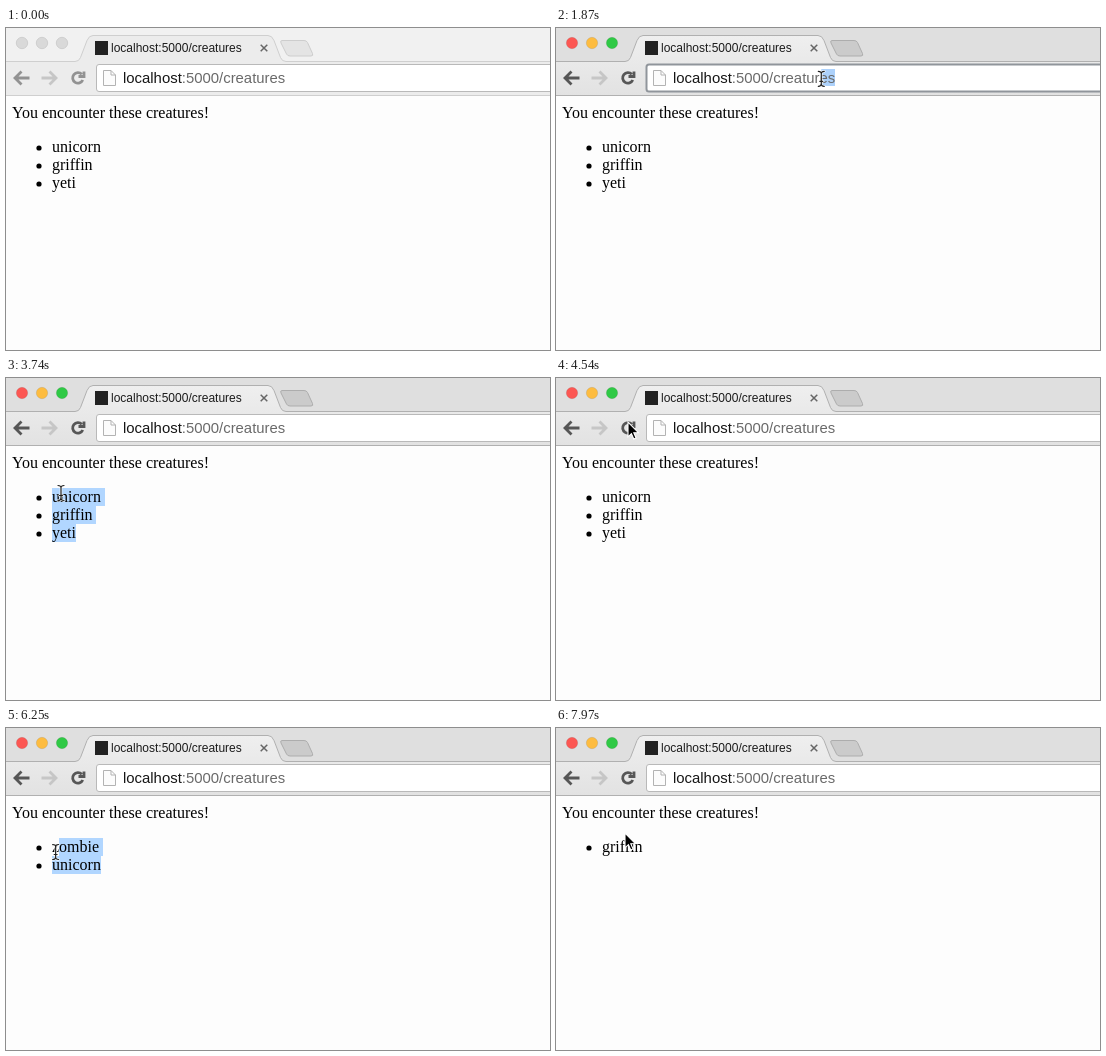
An HTML page for the animation above (8000 ms loop, 544 by 322 pixels).

```html
<!DOCTYPE html>
<html lang="en">
<head>
<meta charset="utf-8">
<title>Creatures</title>
<style>
  html, body { margin: 0; width: 100%; height: 100%; overflow: hidden; background: #fdfdfd; }
  svg { display: block; width: 544px; height: 322px; }
  text { white-space: pre; }
  .ui { font-family: "Liberation Sans", Arial, sans-serif; }
  .page { font: 16px "Liberation Serif", "Times New Roman", serif; }
  .icon { fill: none; stroke: #565656; stroke-width: 2.8; }
  .strip { fill: #dfdfdf; }
  .bar { fill: url(#barFill); stroke: #b0b0b0; }
  .plus { fill: #cbcbcb; stroke: #adadad; }
  .off .icon { stroke: #929292; }
  .icon.dim, .off .icon.dim { stroke: #c6c6c6; }
  .off .strip { fill: #f1f1f1; }
  .off .bar { fill: #ececec; stroke: #cfcfcf; }
  .off .plus { fill: #e4e4e4; stroke: #cdcdcd; }
  .off .light { fill: #d9d9d9; stroke: #c6c6c6; }
</style>
</head>
<body>
<svg id="stage" viewBox="0 0 544 322" class="off">
  <defs>
    <linearGradient id="barFill" x2="0" y2="1">
      <stop stop-color="#efefef"/><stop offset="1" stop-color="#e2e2e2"/>
    </linearGradient>
    <path id="beamShape" d="M-3 -7.5Q0 -7.5 0 -5V5Q0 7.5 -3 7.5M3 -7.5Q0 -7.5 0 -5M3 7.5Q0 7.5 0 5M-1.5 2.5h3"/>
  </defs>
  <rect width="544" height="322" fill="#fdfdfd"/>

  <rect class="strip" width="544" height="34"/>
  <g id="lights"></g>
  <path class="plus" d="M276 12.5h22q2.500 0 3.500 2l5 11q1 2.500 -1.500 2.500h-21q-2.500 0 -3.500 -2l-5.500 -11q-1 -2.500 1 -2.500z"/>
  <path class="bar" d="M-2 33.5H69q4 0 5.500 -4L81 12.500q2 -5 6 -5H262q4 0 6 5L274.500 29.500q1.500 4 5.500 4H546v34H-2z"/>

  <rect id="favicon" x="89" y="13" width="13" height="14" fill="#222"/>
  <circle id="spinner" cx="95.500" cy="20" r="5.500" fill="none" stroke="#8a8a8a" stroke-width="2" stroke-dasharray="26 9"/>
  <text class="ui" x="105" y="24" font-size="12" fill="#1c1c1c">localhost:5000/creatures</text>
  <path d="M254.700 16.700l6.600 6.600m0-6.600l-6.600 6.600" stroke="#666" stroke-width="1.500"/>

  <path class="icon" d="M23.500 50H10m5.500-6.500L9 50l6.500 6.500"/>
  <path class="icon dim" d="M35.500 50H49m-5.500-6.500L50 50l-6.500 6.500"/>
  <path class="icon" d="M75.800 46.200A5.300 5.300 0 1 0 76.800 52M78 43.500v5h-5.500"/>

  <rect id="box" x="90.500" y="36.500" width="460" height="27" rx="2.500" fill="#fff"/>
  <path d="M97.500 42.500h7.500l4.500 4.500v10.500h-12zm7.500 0v4.500h4.500" fill="#fcfcfc" stroke="#b3b3b3"/>
  <rect id="urlMark" y="41" height="17" fill="#acd1fb"/>
  <text class="ui" x="117" y="55" font-size="14.900" fill="#161616">localhost<tspan fill="#6a6a6a">:5000/creatures</tspan></text>

  <g id="marks" fill="#b1d6ff"></g>
  <g class="page">
    <text x="6" y="90">You encounter these creatures!</text>
    <g id="list"></g>
  </g>

  <path id="arrow" d="M0 0v14.800l3.400-3.200l2.400 5.400l2.300-1l-2.300-5.300h4.600z" stroke="#fff" stroke-width="1.100"/>
  <g id="beam" fill="none" stroke-linecap="round">
    <use href="#beamShape" stroke="#fff" stroke-opacity=".8" stroke-width="2.600"/>
    <use href="#beamShape" stroke="#222" stroke-width="1.200"/>
  </g>
</svg>
<script>
const LOOP = 8000, LEFT = 46, TOP = 110, ROW = 18;
const $ = id => document.getElementById(id);
const clamp = (v, lo, hi) => Math.max(lo, Math.min(hi, v));
const show = (el, on) => el.setAttribute("visibility", on ? "visible" : "hidden");
const within = (t, spans) => spans.some(([a, b]) => t >= a && t < b);

// Each move: start, end, then evenly timed stops. It sets out from the last stop.
const ORIGIN = [410, 315];
const moves = [
  [360, 540, [187, 173]],
  [920, 1650, [229, 39], [280, 14], [292, 42], [291, 51]],
  [1730, 2330, [107, 50]],
  [2480, 2530, [101, 116]],
  [2530, 2840, [88, 177], [73, 157]],
  [2840, 3350, [47, 116]],
  [3715, 3740, [55, 115]],
  [3740, 3990, [88, 98]],
  [4360, 4540, [72, 44]],
  [5530, 5680, [88, 99]],
  [5680, 5950, [100, 140], [97, 137]],
  [5950, 6390, [35, 120]],
  [6670, 6980, [88, 63]],
  [6980, 7100, [72, 44]],
  [7820, 7970, [69, 105]]
];
const beams = [[1070, 1120], [1430, 2500], [2840, 3850], [5950, 6750]];
const reloads = [[4960, 5160], [7230, 7420]];
const drags = [
  { from: 2840, to: 3350, clear: 4140, ends: [99, 90, 70] },
  { from: 5950, to: 6390, clear: 7330, ends: [97, 95] }
];
const lists = [
  [0, ["unicorn", "griffin", "yeti"]],
  [5060, ["zombie", "unicorn"]],
  [7330, ["griffin"]]
];

// Smooth curve through the stops, at rest at both ends.
function along(stops, u) {
  const n = stops.length - 1, i = Math.min(Math.floor(u * n), n - 1);
  const f = u * n - i, g = 1 - f;
  const slope = (j, k) => j > 0 && j < n ? (stops[j + 1][k] - stops[j - 1][k]) / 2 : 0;
  return [0, 1].map(k =>
    g * g * (1 + 2 * f) * stops[i][k] + f * f * (3 - 2 * f) * stops[i + 1][k]
    + f * g * (g * slope(i, k) - f * slope(i + 1, k)));
}

function pointer(t) {
  let pos = ORIGIN;
  for (const [from, to, ...stops] of moves) {
    if (t < from) break;
    pos = along([pos, ...stops], clamp((t - from) / (to - from), 0, 1));
  }
  return pos;
}

function markup(names) {
  return names.map((name, i) => {
    const y = TOP + ROW * i;
    return `<circle cx="33" cy="${y + 10}" r="2.6"/><text x="${LEFT}" y="${y + 14}">${name}</text>`;
  }).join("");
}

function selection(t) {
  const drag = drags.find(d => t >= d.from && t < d.clear);
  if (!drag) return "";
  const [px, py] = pointer(Math.min(t, drag.to));
  const row = clamp(Math.floor((py - TOP) / ROW), 0, drag.ends.length - 1);
  return drag.ends.map((end, i) => {
    if (i < row) return "";
    const x = i > row ? LEFT : clamp(LEFT + Math.round((px - LEFT) / 7) * 7, LEFT, end);
    return `<rect x="${x}" y="${TOP + ROW * i}" width="${end - x}" height="${ROW}"/>`;
  }).join("");
}

$("lights").innerHTML = ["#fc5753", "#fdbc40", "#2fc945"].map((c, i) =>
  `<circle class="light" cx="${16 + 20 * i}" cy="15" r="5.7" fill="${c}" stroke="#0002" stroke-width=".7"/>`).join("");

let current;
function draw(t) {
  $("stage").setAttribute("class", t < 710 ? "off" : "");

  const focus = t >= 1730 && t < 2840;
  $("box").setAttribute("stroke", focus ? "#90959b" : "#b9b9b9");
  $("box").setAttribute("stroke-width", focus ? 2 : 1);
  const start = clamp(pointer(Math.min(t, 2330))[0], 117, 279);
  $("urlMark").setAttribute("x", start);
  $("urlMark").setAttribute("width", focus ? 279 - start : 0);

  const names = lists.filter(l => t >= l[0]).pop()[1];
  if (names !== current) $("list").innerHTML = markup(current = names);
  $("marks").innerHTML = selection(t);

  const busy = within(t, reloads);
  show($("favicon"), !busy);
  show($("spinner"), busy);
  $("spinner").setAttribute("transform", `rotate(${t * 0.5 % 360} 95.5 20)`);

  const [x, y] = pointer(t), beam = within(t, beams);
  show($("arrow"), t >= 360 && !beam);
  show($("beam"), t >= 360 && beam);
  $(beam ? "beam" : "arrow").setAttribute("transform", `translate(${x.toFixed(2)} ${y.toFixed(2)})`);
}

function tick() {
  draw(performance.now() % LOOP);
  requestAnimationFrame(tick);
}
tick();
</script>
</body>
</html>
```
